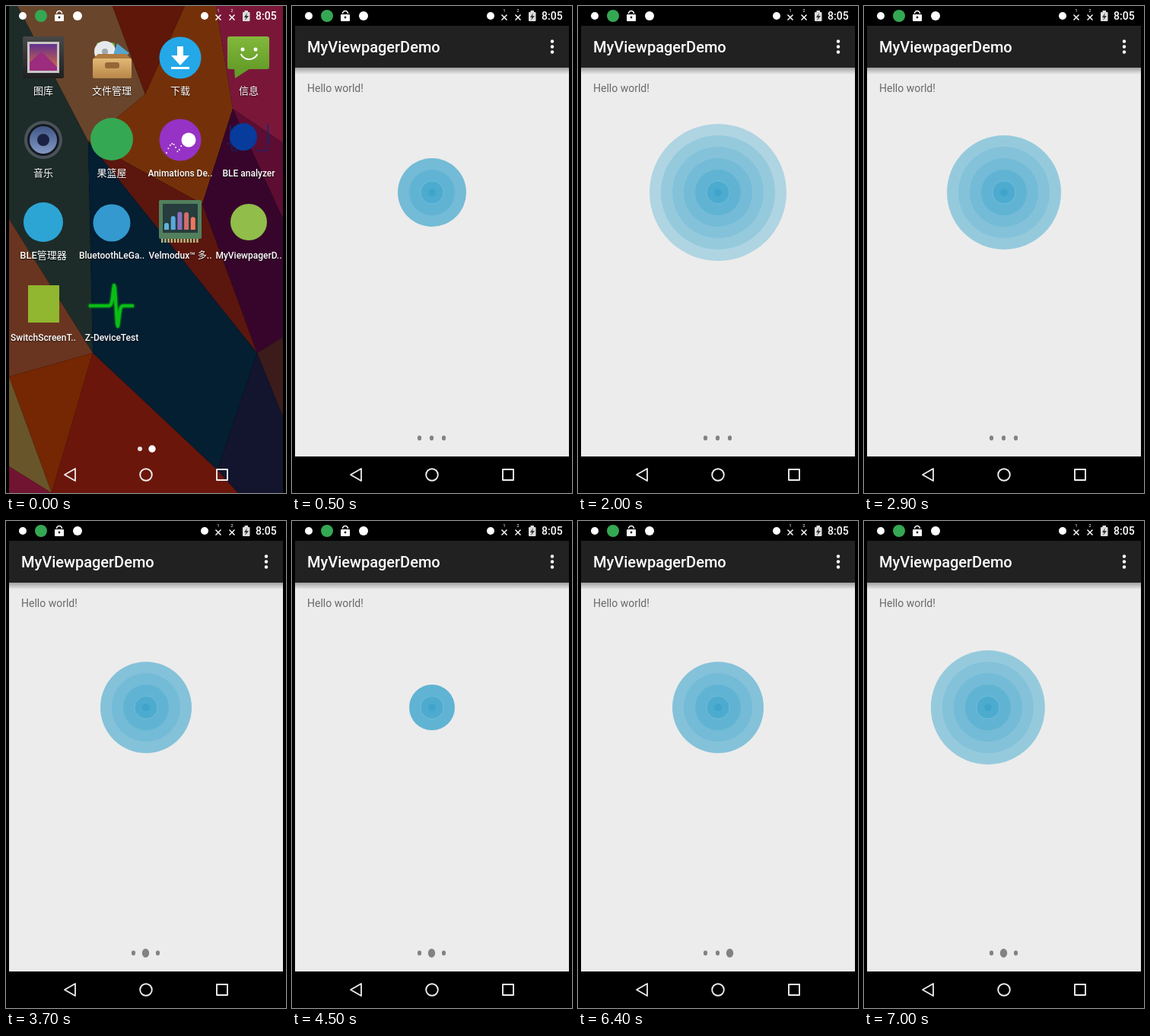
An HTML page with a canvas for the animation above (7.1 s loop, 368x640 px).

```html
<!DOCTYPE html>
<html lang="zh">
<head>
<meta charset="utf-8">
<style>
html, body { margin: 0; width: 368px; height: 640px; overflow: hidden; background: #000; }
canvas { position: absolute; left: 0; top: 0; }
</style>
</head>
<body>
<canvas id="home" width="368" height="640"></canvas>
<canvas id="app" width="368" height="640"></canvas>
<canvas id="bars" width="368" height="640"></canvas>
<script>
const LOOP = 7100, STEP = 100;
const FONT = 'Roboto, "Noto Sans CJK SC", "Noto Sans CJK", sans-serif';
const appCanvas = document.getElementById('app');
const context = id => document.getElementById(id).getContext('2d');
const home = context('home'), app = context('app'), bars = context('bars');
const clamp = x => Math.min(1, Math.max(0, x));

function rect(c, x, y, w, h, fill, r = 0) {
  c.fillStyle = fill;
  c.beginPath();
  c.roundRect(x, y, w, h, r);
  c.fill();
}
function oval(c, x, y, rx, fill, ry = rx) {
  c.fillStyle = fill;
  c.beginPath();
  c.ellipse(x, y, rx, ry, 0, 0, 7);
  c.fill();
}
function ring(c, x, y, r, stroke, width, from = 0, to = 7) {
  c.strokeStyle = stroke;
  c.lineWidth = width;
  c.beginPath();
  c.arc(x, y, r, from, to);
  c.stroke();
}
function trace(c, pts) {
  c.beginPath();
  for (let i = 0; i < pts.length; i += 2) c.lineTo(pts[i], pts[i + 1]);
}
function poly(c, fill, ...pts) {
  trace(c, pts);
  c.fillStyle = fill;
  c.fill();
}
function line(c, stroke, width, ...pts) {
  trace(c, pts);
  c.strokeStyle = stroke;
  c.lineWidth = width;
  c.lineJoin = 'round';
  c.stroke();
}
function text(c, str, x, y, size, fill, weight = 400, align = 'left') {
  c.font = `${weight} ${size}px ${FONT}`;
  c.fillStyle = fill;
  c.textAlign = align;
  c.fillText(str, x, y);
}
function fade(c, y0, y1, a, b) {
  const g = c.createLinearGradient(0, y0, 0, y1);
  g.addColorStop(0, a);
  g.addColorStop(1, b);
  return g;
}

// Corners shared by the wallpaper facets.
const CORNERS = {
  a: [4, 0], b: [15, 0], c: [140, 0], d: [235, 0], e: [276, 0], f: [364, 0],
  g: [183, 116], h: [298, 135], i: [364, 180], j: [108, 178], k: [258, 260],
  l: [364, 280], m: [4, 280], n: [364, 435], o: [330, 456], p: [114, 456],
  q: [4, 487], r: [364, 540], s: [4, 605], t: [278, 610], u: [4, 640],
  v: [60, 640], w: [305, 640], x: [364, 640]
};
const FACETS = {
  bcgj: '#69452b', cdg: '#5e1708', dehkjg: '#743109', efih: '#7a1739',
  hil: '#5d0d32', hlnok: '#37052b', jko: '#5b160e', abjpm: '#1d2c29',
  jotp: '#041e32', mpq: '#6a3520', qpv: '#752603', qvs: '#69552a',
  svu: '#711431', ptwv: '#6b160b', onr: '#3b1c1b', orxwt: '#12152d'
};

function drawWallpaper(c) {
  for (const [names, color] of Object.entries(FACETS)) {
    const pts = [...names].flatMap(n => CORNERS[n]);
    poly(c, color, ...pts);
  }
}

function drawIcons(c) {
  // gallery
  rect(c, 22, 40, 54, 55, fade(c, 40, 95, '#484848', '#202020'), 2);
  rect(c, 28, 47, 42, 41, '#c9c6c6');
  rect(c, 31, 50, 36, 35, fade(c, 50, 85, '#62308f', '#e0703a'));
  poly(c, '#9b2c7e', 31, 74, 47, 60, 67, 80, 67, 85, 31, 85);

  // file box
  rect(c, 119, 48, 24, 25, '#68b342', 3);
  oval(c, 130, 60, 14, '#e6e9ec');
  oval(c, 130, 60, 4, '#9fa8af');
  poly(c, '#57a5cf', 146, 49, 162, 62, 150, 73, 139, 70);
  poly(c, '#af7a40', 114, 70, 121, 63, 158, 63, 165, 70);
  rect(c, 114, 69, 51, 26, fade(c, 69, 95, '#e2b875', '#b98749'), 2);
  rect(c, 130, 74, 19, 8, '#976637', 3);

  // download
  oval(c, 229, 68, 27.5, '#24a8e8');
  rect(c, 225, 53, 8, 13, '#fff');
  poly(c, '#fff', 217, 65, 241, 65, 229, 78);
  rect(c, 217, 80, 24, 3, '#fff');

  // messages
  rect(c, 291, 40, 55, 43, fade(c, 40, 83, '#83b83b', '#659d29'), 3);
  poly(c, '#659d29', 300, 82, 321, 82, 301, 95);
  oval(c, 311, 57, 2.5, '#fff');
  oval(c, 328, 57, 2.5, '#fff');
  ring(c, 319.5, 58, 12, '#fff', 2, .45, 2.7);

  // speaker
  oval(c, 49, 176, 25, '#4a525a');
  oval(c, 49, 176, 21, '#15191f');
  oval(c, 49, 176, 18, fade(c, 158, 194, '#3f5685', '#8398c4'));
  oval(c, 49, 176, 8, '#1a2142');

  oval(c, 139, 175, 28, '#35a853');

  // bouncing ball
  oval(c, 229, 176, 27.5, '#9632c5');
  oval(c, 240, 176, 9.5, '#fff');
  for (let i = 0; i < 9; i++)
    oval(c, 211 + i * 2.4, 193 - Math.abs(Math.sin(i * .5)) * 12, 1, '#fff');

  // signal strip
  line(c, '#102b70', 1, 290, 181, 295, 181, 295, 156, 297, 190, 304, 190);
  line(c, '#102b70', 1, 323, 181, 330, 190, 344, 190, 344, 155, 346, 181);
  oval(c, 312, 172, 18, '#073b9c');

  oval(c, 49, 284, 26, '#2ca5d5');
  oval(c, 139, 285, 24.5, '#3499ce');

  // chart board
  rect(c, 201, 255, 56, 51, '#527f5d', 2);
  rect(c, 206, 260, 46, 38, '#263c3d');
  for (let i = 0; i < 12; i++) rect(c, 204 + i * 4.2, 306, 2.4, 5, '#b7bc83');
  ['#60b4d8', '#58a9db', '#8e6ec0', '#d66c6b', '#f07759'].forEach((color, i) => {
    const h = 9 + 15 * Math.sin(i * .65);
    rect(c, 208 + i * 8.7, 294 - h, 6, h, color, [3, 3, 0, 0]);
  });

  oval(c, 319, 284, 24, '#91bd4b');
  rect(c, 29, 367, 41, 49, '#91b62f');

  // pulse
  const pulse = [];
  for (let x = 109; x <= 168; x++) {
    const u = (x - 144.5) / 3.2;
    pulse.push(x, 394 + 64 * u * Math.exp(-u * u));
  }
  c.shadowColor = '#0f0';
  c.shadowBlur = 3;
  line(c, '#0bbd16', 3.5, ...pulse);
  c.shadowBlur = 0;
}

const LABELS = [
  '图库', '文件管理', '下载', '信息',
  '音乐', '果篮屋', 'Animations De..', 'BLE analyzer',
  'BLE管理器', 'BluetoothLeGa..', 'Velmodux™ 多..', 'MyViewpagerD..',
  'SwitchScreenT..', 'Z-DeviceTest'
];

function drawHome(c) {
  drawWallpaper(c);
  drawIcons(c);
  c.shadowColor = 'rgba(0,0,0,.7)';
  c.shadowBlur = 2;
  c.shadowOffsetY = 1;
  LABELS.forEach((label, i) => {
    const size = label.length > 8 ? 12 : 13;
    text(c, label, 49 + i % 4 * 90, 116 + Math.floor(i / 4) * 108, size, '#fff', 500, 'center');
  });
  c.shadowColor = 'transparent';
  oval(c, 176, 582, 3, '#e5e2e4');
  oval(c, 192, 582, 4.7, '#fff');
}

function drawBars(c) {
  oval(c, 22, 13, 5, '#fff');
  oval(c, 46, 13, 8, '#35a853');
  rect(c, 64, 11, 12, 9, '#fff', 1);
  ring(c, 70, 10, 3.5, '#fff', 1.6, Math.PI, 2 * Math.PI);
  oval(c, 70, 15, 1.4, '#222');
  oval(c, 94, 13, 6, '#fff');
  oval(c, 261, 13, 5, '#fff');
  [279, 297].forEach((x, i) => {
    line(c, '#fff', 1.5, x - 3.5, 11.5, x + 3.5, 18.5);
    line(c, '#fff', 1.5, x + 3.5, 11.5, x - 3.5, 18.5);
    text(c, i + 1, x, 8, 6, '#fff', 400, 'center');
  });
  rect(c, 311, 8, 9.5, 12, '#ddd', 1);
  rect(c, 313.5, 6, 4.5, 2, '#ddd');
  poly(c, '#333', 317, 9, 313, 15, 315.5, 15, 314, 19, 319, 13, 316, 13);
  text(c, '8:05', 328, 18, 14, '#fff', 500);

  trace(c, [77, 616, 91, 608, 91, 624]);
  c.closePath();
  c.strokeStyle = '#eee';
  c.lineWidth = 1.8;
  c.stroke();
  ring(c, 184, 616, 7.8, '#eee', 1.9);
  c.strokeRect(277, 609, 14, 14);
}

// Ripple: one more ring per beat, from none up to eight.
const BEAT = 118;
const RINGS = ['#4dabcf', '#60b3d3', '#73bbd6', '#84c2da', '#95cadd', '#afd4e2', '#c8dfe7', '#dce6ea'];
const PAGES = [
  { wake: 134, sleep: 3150 },
  { wake: 3165, sleep: 4850 },
  { wake: 4865, sleep: 6700 }
];

function ringCount(t, { wake, sleep }) {
  const age = Math.max(0, Math.min(t, sleep) - wake);
  return Math.floor(age / BEAT) % (RINGS.length + 1);
}

function drawRipple(c, x, count) {
  for (let k = count; k > 0; k--) oval(c, x, 245, 15 * k, RINGS[k - 1]);
  if (count) ring(c, x, 245, 15, 'rgba(255,255,255,.16)', 1);
  oval(c, x, 245, 5, '#40a4ca');
}

// Each swipe glides to a neighbouring page; its dot grows shortly after the start.
const PAGE_WIDTH = 328, GLIDE = 355, SELECT_DELAY = 120;
const SWIPES = [
  { start: 3063, from: 0, to: 1 },
  { start: 4766, from: 1, to: 2 },
  { start: 6700, from: 2, to: 1 }
];
const smooth = x => x * x * (3 - 2 * x);

function scrollAt(t) {
  return PAGE_WIDTH * SWIPES.reduce(
    (sum, s) => sum + (s.to - s.from) * smooth(clamp((t - s.start) / GLIDE)), 0);
}
function selectedAt(t) {
  return SWIPES.findLast(s => t >= s.start + SELECT_DELAY)?.to;
}

function drawApp(c, t, drop) {
  rect(c, 0, 0, 368, 640, '#000');
  c.save();
  c.beginPath();
  c.rect(4, 26, 360, 566);
  c.clip();
  c.translate(0, drop);
  rect(c, 4, 26, 360, 566, '#ececec');
  rect(c, 4, 81, 360, 9, fade(c, 81, 90, 'rgba(0,0,0,.32)', 'rgba(0,0,0,0)'));
  rect(c, 4, 26, 360, 55, '#212121');
  text(c, 'MyViewpagerDemo', 20, 61, 20, '#fff', 500);
  for (let k = -1; k < 2; k++) oval(c, 342, 53.5 + 7 * k, 2.2, '#fff');
  text(c, 'Hello world!', 20, 113, 14, '#696969');

  const selected = selectedAt(t);
  PAGES.forEach((_, k) => {
    const r = k === selected ? 4.7 : 2.6;
    oval(c, 167.5 + 16 * k, 567.8, r, '#828282', r * 1.25);
  });

  c.beginPath();
  c.rect(20, 98, PAGE_WIDTH, 460);
  c.clip();
  PAGES.forEach((page, k) => drawRipple(c, 184 + PAGE_WIDTH * k - scrollAt(t), ringCount(t, page)));
  c.restore();
}

function frame() {
  const t = Math.floor(performance.now() % LOOP / STEP) * STEP;
  const opened = clamp((t - 20) / 230);
  appCanvas.style.opacity = opened;
  drawApp(app, t, 45 * (1 - opened) ** 2);
  requestAnimationFrame(frame);
}

drawHome(home);
drawBars(bars);
frame();
</script>
</body>
</html>
```
